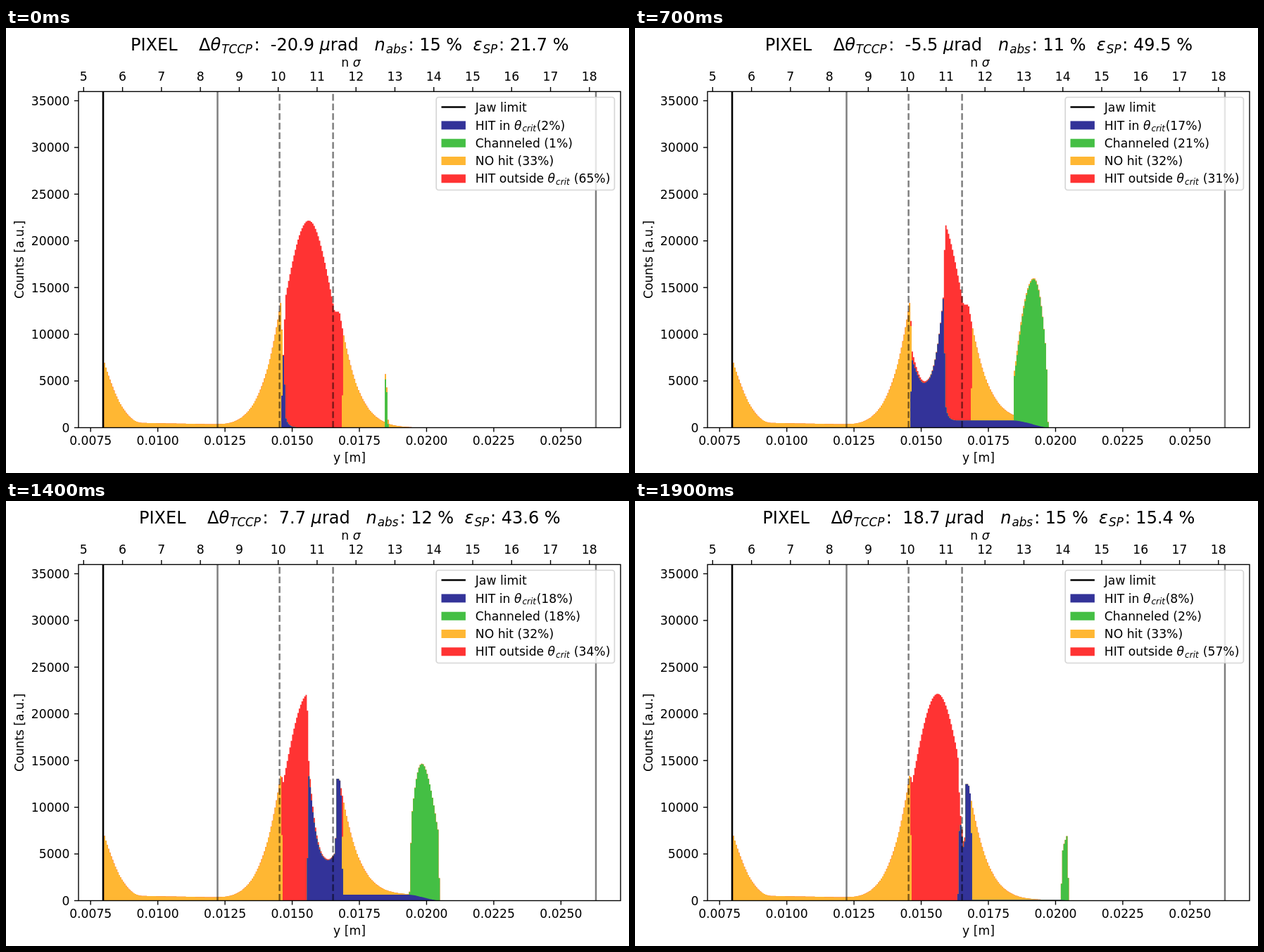
Write an HTML page that moves like this. It is 885 px wide and 633 px high and loops after 2000 ms.

```html
<!DOCTYPE html>
<html lang="en">
<head>
<meta charset="utf-8">
<title>Hit histogram scan</title>
<style>
html, body { margin: 0; width: 100%; height: 100%; overflow: hidden; background: #fff; }
svg { display: block; width: 885px; height: 633px; }
text { font: 17.2px "DejaVu Sans", sans-serif; white-space: pre; font-kerning: none; }
.title { font-size: 24px; }
.it { font-style: italic; }
.sub { font-style: italic; font-size: .7em; }
.mid { text-anchor: middle; }
.end { text-anchor: end; }
</style>
</head>
<body>
<svg id="stage" viewBox="0 0 885 633"></svg>
<script>
const stage = document.getElementById('stage');
const LEFT = 103, RIGHT = 873, TOP = 90, BASE = 568.5;
const BIN = 1.909, X0 = 139.1, BINS = 250, SUB = 6, STEP = BIN / SUB;
const COLORS = { hit: '#333399', chan: '#44bf44', miss: '#ffb733', out: '#ff3333' };
const FRAMES = 20, FRAME_MS = 100;

const { abs, exp, min, max, hypot, cos, sin, PI } = Math;
const clamp = v => max(0, min(1, v));
const yOf = n => BASE - n * 0.013286;

// Beam profile: gaussian core, steep flanks on both sides, halo at the jaw.
const CENTRE = 431;
function flank(x) {
  const t = abs(x - CENTRE) - 40;
  return exp(9.53 - 0.0365 * t - 0.000165 * t * t);
}
const core = x => 22150 * exp(-(((x - 430) / 34.2) ** 2) / 2);
const dome = x => min(flank(x), max(12400, core(x)));
function halo(x) {
  if (x > CENTRE) return 0;
  return 500 - 1.4 * (x - 200) + 6350 * max(0, 1 - (x - 140) / 55) ** 2.2;
}

// Crystal extent, channeling limit, and the deflection in sub-steps.
const IN = 391.9, OUT = 478.2, CHAN_END = 469.1, KICK = Math.round(146.1 / STEP);

// Tilt angle: steady steps of 2.2 with an extra stop at zero.
const angleAt = i => i === 10 ? 0 : -20.9 + 2.2 * (i > 10 ? i - 1 : i);

function histogram(angle) {
  const lo = 406.8 + 2.85 * angle, hi = 455.3 + 2.85 * angle, mid = (lo + hi) / 2;
  const n = BINS * SUB, sum = new Float64Array(n + 1), chan = new Float64Array(n);
  const bins = Array.from({ length: BINS }, () => ({ hit: 0, chan: 0, miss: 0, out: 0 }));
  for (let j = 0; j < n; j++) {
    const x = X0 + (j + 0.5) * STEP, b = bins[Math.floor(j / SUB)];
    let hit = 0, miss = 0, out = 0;
    if (x > IN && x < OUT) {
      const e = dome(x), w = clamp((x - lo) / 2 + 0.5) * clamp((hi - x) / 2 + 0.5);
      const u = abs(x - mid) / 24.3;
      const keep = x < CHAN_END ? min(1, 0.23 + 0.45 * u ** 2.3) : 1;
      hit = e * w * keep;
      chan[j] = e * w * (1 - keep);
      out = e * (1 - w);
      if (x > hi) {
        const spill = min(out, 0.12 * e * exp((hi - x) / 3.5));
        hit += spill;
        out -= spill;
      }
      if (x < CHAN_END) out += w * (60 + 1200 * exp((lo - x) / 9));
    } else {
      miss = hypot(flank(x), halo(x));
    }
    sum[j + 1] = sum[j] + chan[j] / SUB;
    const from = max(0, j - KICK);
    hit += 0.0025 * (sum[j] - sum[from]);
    b.hit += hit / SUB;
    b.chan += (j >= KICK ? 0.965 * chan[from] : 0) / SUB;
    b.miss += miss / SUB;
    b.out += out / SUB;
  }
  return bins;
}

// Stacked step outlines, one per series.
function stackPaths(bins) {
  const paths = {}, total = new Float64Array(BINS);
  for (const k in COLORS) {
    let d = `M${X0} ${BASE}`;
    bins.forEach((b, i) => {
      total[i] += b[k];
      d += `V${yOf(total[i]).toFixed(2)}H${(X0 + (i + 1) * BIN).toFixed(2)}`;
    });
    paths[k] = d + `V${BASE}Z`;
  }
  return paths;
}

const text = (x, y, s, cls = '', more = '') => `<text x="${x}" y="${y}" class="${cls}" ${more}>${s}</text>`;
const line = (x1, y1, x2, y2, w = 1.38, more = '') =>
  `<path d="M${x1} ${y1}L${x2} ${y2}" fill="none" stroke="#000" stroke-width="${w}" ${more}/>`;
const sub = (s, drop, gap, after) =>
  `<tspan class="sub" dx="1" dy="${drop}">${s}</tspan><tspan dx="${gap}" dy="${-drop}">${after}</tspan>`;
const it = s => `<tspan class="it">${s}</tspan>`;

function axes() {
  let s = '';
  for (let i = 0; i < 8; i++) {
    const y = yOf(i * 5000), x = 120.2 + i * 95.45;
    s += line(LEFT - 6, y, LEFT, y) + text(90.5, y + 6.3, i * 5000, 'end');
    s += line(x, BASE, x, BASE + 6) + text(x, 593.3, (0.0075 + i * 0.0025).toFixed(4), 'mid');
  }
  for (let i = 5; i <= 18; i++) {
    const x = 110.3 + (i - 5) * 55.27;
    s += line(x, TOP - 6, x, TOP) + text(x, 75, i, 'mid');
  }
  return s + `<rect x="${LEFT}" y="${TOP + 0.4}" width="${RIGHT - LEFT}" height="${BASE - TOP - 0.4}" fill="none" stroke="#000" stroke-width="1.38"/>`
    + text(488, 617, 'y [m]', 'mid') + text(490, 55, 'n ' + it('σ'), 'mid')
    + text(0, 0, 'Counts [a.u.]', 'mid', 'transform="translate(25 329.5) rotate(-90)"');
}

function guides() {
  const half = 'stroke-opacity=".5"', dash = half + ' stroke-dasharray="9.55 4.13"';
  return line(138, BASE, 138, TOP, 2.58)
    + [300.5, 838].map(x => line(x, BASE, x, TOP, 2.5, half)).join('')
    + [388.6, 464.6].map(x => line(x, BASE, x, TOP, 2.5, dash)).join('');
}

function legend() {
  const patches = Object.values(COLORS).map((c, i) =>
    `<rect x="618.5" y="${132.4 + i * 25.3}" width="34.4" height="12" fill="${c}"/>`
    + text(666.8, 144.5 + i * 25.3, '', 'row')).join('');
  return `<rect x="611.2" y="98.5" width="253.2" height="132" rx="3.4" fill="#fff" fill-opacity=".8" stroke="#ccc" stroke-opacity=".8" stroke-width="1.7"/>`
    + line(618.5, 112.5, 652.9, 112.5, 2.58) + text(666.8, 119, 'Jaw limit') + patches;
}

stage.innerHTML = '<rect width="885" height="633" fill="#fff"/>'
  + Object.keys(COLORS).reverse().map(k => `<path id="${k}" fill="${COLORS[k]}"/>`).join('')
  + guides() + axes() + legend() + text(488.3, 32, '', 'title mid', 'id="title"');

const el = id => document.getElementById(id);
const rows = stage.querySelectorAll('.row');

// Readouts: smooth functions of the angle, or a few key values over the scan.
const STOPS = [0, 2, 5, 9, 12, 16, 19];
function keyed(vals, i) {
  const k = max(1, STOPS.findIndex(s => s >= i)), a = STOPS[k - 1];
  return vals[k - 1] + (vals[k] - vals[k - 1]) * (i - a) / (STOPS[k] - a);
}
const hitShare = a => 21.1 - 0.25 * abs(a) ** 1.4 + 2.1 * sin(a / 10);
const chanShare = a => 23.45 * cos((3.6 * a + 1 + 0.0006 * a ** 3) * PI / 180) ** 2;
const missShare = a => abs(a) < 11 ? 32 : 33;
const outShare = i => keyed([65, 55, 38, 24, 26, 42, 57], i);
const absorbed = a => 10 + abs(a) / 4;
const efficiency = i => keyed([21.7, 40.9, 50.2, 48.7, 48.5, 38.7, 15.4], i);

function show(i) {
  const angle = angleAt(i), paths = stackPaths(histogram(angle));
  for (const k in paths) el(k).setAttribute('d', paths[k]);
  const theta = it('θ'), crit = after => theta + sub('crit', 2.8, 0.6, after);
  const share = v => `(${v.toFixed(0)}%)`;
  rows[0].innerHTML = 'HIT in ' + crit(share(hitShare(angle)));
  rows[1].innerHTML = 'Channeled ' + share(chanShare(angle));
  rows[2].innerHTML = 'NO hit ' + share(missShare(angle));
  rows[3].innerHTML = 'HIT outside ' + crit(' ' + share(outShare(i)));
  el('title').innerHTML = `PIXEL    Δ${theta}`
    + sub('TCCP', 4, 2.5, `:  ${angle.toFixed(1)} `) + it('μ') + 'rad   ' + it('n')
    + sub('abs', 4, 2, `: ${absorbed(angle).toFixed(0)} %  `) + it('ε')
    + sub('SP', 4, 1.8, `: ${efficiency(i).toFixed(1)} %`);
}

let shown = -1;
const start = performance.now();
function tick() {
  const i = Math.floor((performance.now() - start) / FRAME_MS) % FRAMES;
  if (i !== shown) show(shown = i);
  requestAnimationFrame(tick);
}
tick();
</script>
</body>
</html>
```
